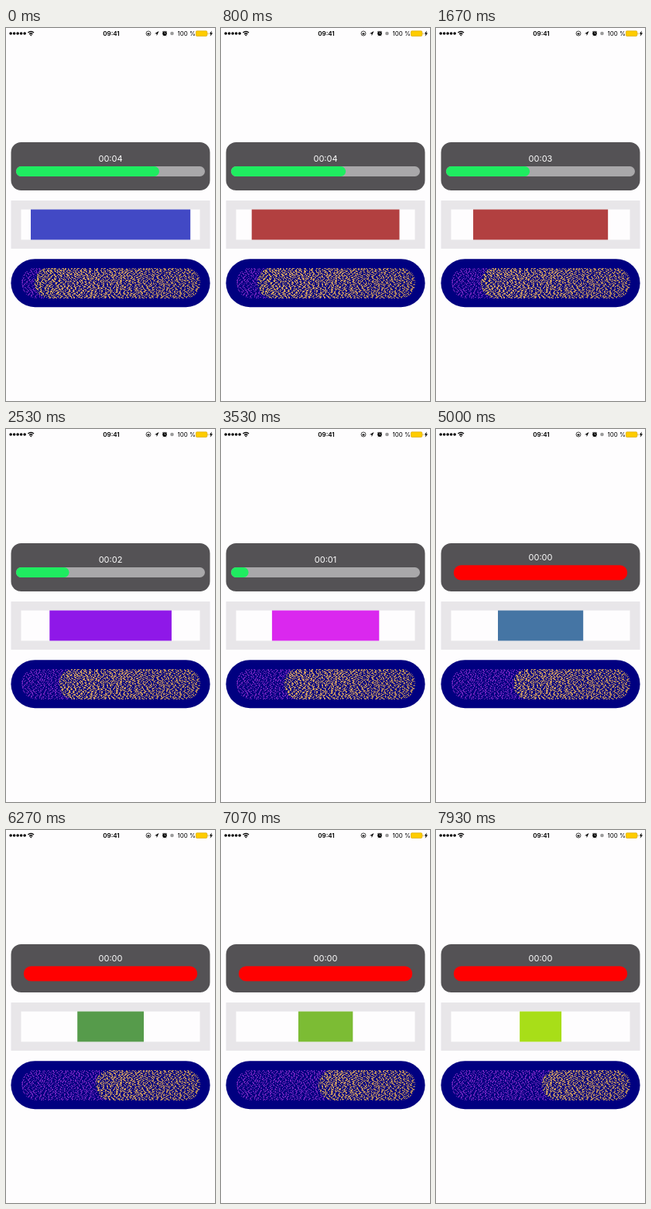
These frames come from a looping animation (270x480 px, 8 s). An HTML page:

```html
<!DOCTYPE html>
<html lang="en">
<head>
<meta charset="utf-8">
<title>Countdown bars</title>
<style>
  html, body { margin: 0; width: 100%; height: 100%; overflow: hidden; background: #fefdfe; }
  svg { display: block; width: 100%; height: 100%; }
  text { font-family: Inter, Roboto, sans-serif; }
  .status { font-size: 8px; }
  .dashes { fill: none; stroke-width: 1; shape-rendering: crispEdges; }
</style>
</head>
<body>
<svg viewBox="0 0 270 480">
  <defs>
    <linearGradient id="gold" gradientUnits="userSpaceOnUse" x1="20" y1="0" x2="251" y2="0">
      <stop stop-color="#c8a058"/><stop offset=".3" stop-color="#c89864"/><stop offset="1" stop-color="#a47c60"/>
    </linearGradient>
    <clipPath id="pill"><rect x="20" y="308" width="231" height="40" rx="20"/></clipPath>
    <clipPath id="goldClip"><rect class="remaining" y="308" height="40" rx="20"/></clipPath>
  </defs>

  <!-- status bar -->
  <g id="signal"></g>
  <g fill="none" stroke="#000" stroke-width="1.3">
    <path d="M28.4 6.1Q32.2 2.8 36 6.1M30 7.9Q32.2 6 34.4 7.9"/>
    <circle cx="184" cy="7" r="3" stroke-width=".7"/>
    <path d="M202.4 5l1.2-1.2M207.6 5l-1.2-1.2M203.4 9.4l-.6.8M206.6 9.4l.6.8" stroke-width=".8"/>
  </g>
  <circle cx="205" cy="7.1" r="2.8"/>
  <path d="M205 5.4v1.8h1.3" fill="none" stroke="#fff" stroke-width=".6"/>
  <path d="M30.9 9l1.3 1.5L33.5 9Q32.2 8 30.9 9M182.6 6.6h2.8v2h-2.8zM192 7.3l5.5-3.2-2.7 6-.4-2.8zM265.8 3.5l-3 4h1.8l-.9 3.3 3.4-4.3h-1.9z"/>
  <circle cx="214.5" cy="7" r="2.3" fill="#9a9a9a"/>
  <text class="status" x="136" y="9.8" text-anchor="middle" font-weight="600">09:41</text>
  <text class="status" x="221.4" y="9.8">100 %</text>
  <rect x="245.4" y="3.8" width="14.4" height="6.6" rx="1.2" fill="#fc0" stroke="#d0a000" stroke-width=".6"/>
  <path d="M260.6 6v2.4q1-.3 1-1.2t-1-1.2" fill="#d0a000"/>

  <!-- timer bar -->
  <rect x="6.5" y="147" width="257" height="62" rx="13" fill="#545255"/>
  <text id="clock" x="135" text-anchor="middle" font-size="11" fill="#fff"></text>
  <g id="running">
    <rect x="13" y="178" width="244" height="13" rx="6.5" fill="#a9a8aa"/>
    <rect id="green" x="13" y="178" height="13" rx="6.5" fill="#1fec60"/>
  </g>
  <rect id="expired" x="22.8" y="175.3" width="224.4" height="19.2" rx="9.6" fill="#f00"/>

  <!-- centred bar -->
  <rect x="6.5" y="222" width="257" height="62" fill="#e8e6e9"/>
  <rect x="19.5" y="233.5" width="231" height="39" fill="#fefdfe"/>
  <rect id="block" y="233.5" height="39"/>

  <!-- patterned bar -->
  <rect x="6.4" y="297.2" width="257.2" height="62" rx="31" fill="#000080"/>
  <g clip-path="url(#pill)"><path id="purpleDashes" class="dashes" stroke="#6c22bc"/></g>
  <rect class="remaining" y="308" height="40" rx="20" fill="#000080"/>
  <g clip-path="url(#goldClip)"><path id="goldDashes" class="dashes" stroke="url(#gold)"/></g>
</svg>
<script>
const LOOP = 8000;
const BLOCK_COLORS = ['#4249c5', '#b24040', '#8f18e8', '#da28ee', '#a450c8',
                      '#4575a4', '#569b4b', '#7cbc34', '#a8de18'];
const $ = id => document.getElementById(id);
const remaining = document.querySelectorAll('.remaining');

function set(element, attributes) {
  for (const name in attributes) element.setAttribute(name, attributes[name]);
}

function seededRandom(seed) {
  return () => (seed = seed * 16807 % 2147483647) / 2147483647;
}

// Dense rows of short horizontal strokes with random lengths and gaps.
function dashPath(seed, maxDash, maxGap) {
  const random = seededRandom(seed);
  const pick = max => 1 + Math.floor(random() * max);
  let d = '';
  for (let y = 309.5; y < 348; y++) {
    for (let x = 19 + pick(3); x < 251;) {
      const dash = pick(maxDash);
      d += `M${x} ${y}h${dash}`;
      x += dash + pick(maxGap);
    }
  }
  return d;
}

function draw(ms) {
  const t = ms / 1000;
  const left = Math.max(0, 4 - t);
  const done = left === 0;

  $('clock').textContent = '00:0' + Math.ceil(left);
  set($('clock'), { y: done ? 169 : 172 });
  set($('running'), { visibility: done ? 'hidden' : 'visible' });
  set($('expired'), { visibility: done ? 'visible' : 'hidden' });
  set($('green'), { width: 1 + 46 * left });

  const width = 206.2 - 19.2 * t;
  set($('block'), { x: 135.1 - width / 2, width, fill: BLOCK_COLORS[Math.floor(t + 0.28)] });

  const x = 36.8 + 12.6 * t;
  remaining.forEach(rect => set(rect, { x, width: 251 - x }));
}

$('signal').innerHTML = [0, 1, 2, 3, 4]
  .map(i => `<circle cx="${6.1 + i * 4.5}" cy="7" r="1.8"/>`).join('');
set($('purpleDashes'), { d: dashPath(71, 2, 5) });
set($('goldDashes'), { d: dashPath(29, 3, 4) });

function tick() {
  draw(performance.now() % LOOP);
  requestAnimationFrame(tick);
}
tick();
</script>
</body>
</html>
```
